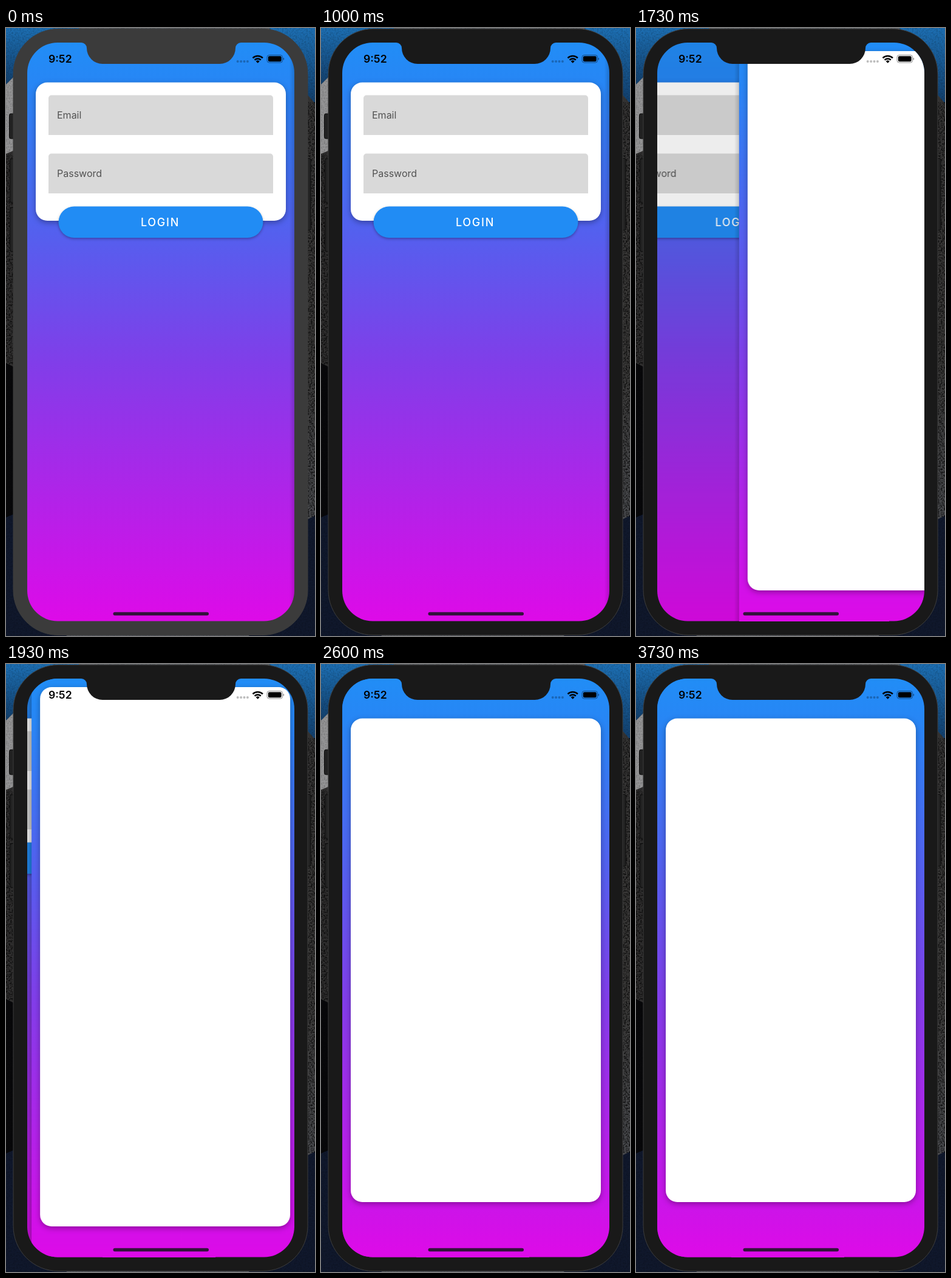
Write an HTML page that moves like this. It is 509 by 1000 pixels and loops after 3790 ms.

```html
<!DOCTYPE html>
<html lang="en">
<head>
<meta charset="utf-8">
<title>Login transition</title>
<style>
  html, body { margin: 0; width: 100%; height: 100%; overflow: hidden; background: #000; }
  svg { display: block; width: 509px; height: 1000px; font-family: Inter, sans-serif; }

  .anim { animation: 3790ms linear infinite; }
  .hard { animation-timing-function: step-end; }

  .bezel { fill: #191919; animation-name: bezel; }
  .press { opacity: 0; animation-name: press; }
  .label { fill: #fff; animation-name: label; }
  .login { animation-name: leave; }
  .next { animation-name: enter; }
  .dim { animation-name: dim; }
  .loose { animation-name: loose; }
  .inset { animation-name: inset; }

  .card { fill: #fff; filter: drop-shadow(0 3px 5px rgba(0, 0, 0, .33)); }
  .button { fill: #218cf4; filter: drop-shadow(0 2px 2px rgba(0, 0, 0, .3)); }
  .field { fill: #d9d9d9; }
  .hint { fill: #525252; font-size: 16px; }

  /* window loses its highlight at 70 ms */
  @keyframes bezel { 0% { fill: #3b3b3b; } 1.847%, 100% { fill: #191919; } }

  /* button held from 1400 to 1600 ms */
  @keyframes press { 0%, 42.2%, 100% { opacity: 0; } 36.94% { opacity: .13; } }
  @keyframes label { 0%, 42.2%, 100% { opacity: 1; } 36.94% { opacity: .78; } }

  /* push from 1615 to 2115 ms */
  @keyframes enter {
    0% { transform: translateX(440px); }
    42.612% { transform: translateX(440px); animation-timing-function: cubic-bezier(.2833, .99, .3183, .99); }
    55.805%, 100% { transform: none; }
  }
  @keyframes leave {
    0% { transform: none; }
    42.612% { transform: none; animation-timing-function: cubic-bezier(.2833, .99, .3183, .99); }
    55.805%, 100% { transform: translateX(-132px); }
  }
  @keyframes dim {
    0% { opacity: 0; }
    42.612% { opacity: 0; animation-timing-function: cubic-bezier(.2833, .99, .3183, .99); }
    55.805%, 100% { opacity: .1; }
  }

  /* safe area applies once the push is over */
  @keyframes loose { 0% { opacity: 1; } 56.2%, 100% { opacity: 0; } }
  @keyframes inset { 0% { opacity: 0; } 56.2%, 100% { opacity: 1; } }
</style>
</head>
<body>
<svg viewBox="0 0 509 1000" xmlns="http://www.w3.org/2000/svg">
  <defs>
    <linearGradient id="sky" x1="0" y1="0" x2="0" y2="1">
      <stop offset="0" stop-color="#218df6"/>
      <stop offset=".07" stop-color="#2786f5"/>
      <stop offset=".34" stop-color="#565eee"/>
      <stop offset=".55" stop-color="#803ee9"/>
      <stop offset="1" stop-color="#de0ae8"/>
    </linearGradient>
    <linearGradient id="blue" x1="0" y1="0" x2="0" y2="1">
      <stop offset="0" stop-color="#1d6fb3"/>
      <stop offset="1" stop-color="#123f6c"/>
    </linearGradient>
    <linearGradient id="stone" x1="0" y1="0" x2="0" y2="1">
      <stop offset="0" stop-color="#343333"/>
      <stop offset=".55" stop-color="#3a3938"/>
      <stop offset="1" stop-color="#55585f"/>
    </linearGradient>
    <linearGradient id="edge">
      <stop offset="0" stop-opacity="0"/>
      <stop offset="1" stop-opacity=".16"/>
    </linearGradient>
    <filter id="grain" x="0" y="0" width="1" height="1">
      <feTurbulence type="fractalNoise" baseFrequency=".4" numOctaves="3" seed="4"/>
      <feColorMatrix values="0 0 0 0 0  0 0 0 0 0  0 0 0 0 0  3 0 0 0 -1.2"/>
    </filter>
    <clipPath id="screen"><rect x="35" y="24" width="440" height="951.5" rx="50"/></clipPath>
  </defs>

  <!-- wallpaper -->
  <rect width="509" height="1000" fill="url(#stone)"/>
  <rect y="200" width="60" height="360" fill="#302f2f"/>
  <path d="M0 0H130V70L12 81 0 93Z" fill="url(#blue)"/>
  <path d="M120 0H434V10H120Z" fill="#5f6469"/>
  <path d="M434 0H509V124L490 102Z" fill="url(#blue)"/>
  <path d="M0 93 14 79V201L0 207Z" fill="#959596"/>
  <path d="M0 551 14 558V800L0 806Z" fill="#08080a"/>
  <path d="M0 805 14 799 100 1000H0Z" fill="#10182c"/>
  <path d="M509 802 495 809 400 1000H509Z" fill="#10182c"/>
  <rect y="207" width="14" height="346" filter="url(#grain)" opacity=".65"/>
  <rect x="495" y="122" width="14" height="682" filter="url(#grain)" opacity=".65"/>
  <rect width="509" height="1000" filter="url(#grain)" opacity=".15"/>

  <!-- phone -->
  <g fill="#222" stroke="#0b0b0b">
    <rect x="5.5" y="141" width="12" height="41" rx="2.5"/>
    <rect x="6.5" y="215" width="12" height="72" rx="2.5"/>
    <rect x="6.5" y="295.500" width="12" height="72" rx="2.5"/>
    <rect x="490" y="214.500" width="12" height="118" rx="2.5"/>
  </g>
  <rect class="bezel anim hard" x="12" y="1.500" width="485" height="997" rx="74" stroke="#3d3d3d"/>

  <g clip-path="url(#screen)">
    <g class="login anim">
      <rect x="35" y="24" width="440" height="952" fill="url(#sky)"/>
      <rect class="card" x="49" y="89.500" width="412" height="227.500" rx="19"/>
      <path class="field" d="M70 176V115.500a5 5 0 0 1 5-5H435a5 5 0 0 1 5 5V176Z"/>
      <path class="field" d="M70 272V211.500a5 5 0 0 1 5-5H435a5 5 0 0 1 5 5V272Z"/>
      <text class="hint" x="84" y="148.500">Email</text>
      <text class="hint" x="84" y="244.500">Password</text>
      <rect class="button" x="86.500" y="293.500" width="337" height="51.500" rx="25.750"/>
      <rect class="press anim hard" x="86.500" y="293.500" width="337" height="51.500" rx="25.750"/>
      <text class="label anim hard" x="222" y="326" font-size="18" font-weight="500" letter-spacing="1.7">LOGIN</text>
    </g>
    <rect class="dim anim" x="35" y="24" width="440" height="952"/>

    <g class="next anim">
      <rect x="27" y="24" width="8" height="952" fill="url(#edge)"/>
      <rect x="35" y="24" width="440" height="952" fill="url(#sky)"/>
      <g class="loose anim hard"><rect class="card" x="49" y="38" width="412" height="887" rx="19"/></g>
      <g class="inset anim hard"><rect class="card" x="49" y="89.500" width="412" height="795.500" rx="19"/></g>
    </g>
  </g>

  <path class="bezel anim hard" d="M124 23V24a9 9 0 0 1 9 9a26 26 0 0 0 26 26H352a26 26 0 0 0 26-26a9 9 0 0 1 9-9V23Z"/>

  <!-- status bar -->
  <text x="70" y="57" font-size="17.600" font-weight="600">9:52</text>
  <g opacity=".26">
    <circle cx="381.700" cy="55" r="2"/>
    <circle cx="387.100" cy="55" r="2"/>
    <circle cx="392.500" cy="55" r="2"/>
    <circle cx="397.900" cy="55" r="2"/>
  </g>
  <g fill="none" stroke="#000" stroke-width="2.500">
    <path d="M406.500 49.300a11.700 11.700 0 0 1 16.400 0"/>
    <path d="M409.600 52.600a7.300 7.300 0 0 1 10.200 0"/>
  </g>
  <path d="M411.700 54.700a4.300 4.300 0 0 1 6 0L414.700 57.700Z"/>
  <rect x="430" y="44.500" width="25.500" height="12.500" rx="3.600" fill="none" stroke="#000" stroke-opacity=".45"/>
  <rect x="431.800" y="46.200" width="21.900" height="9.100" rx="2.200"/>
  <path d="M456.700 48.700a2.300 2.300 0 0 1 0 4.200Z" opacity=".5"/>

  <rect x="176.500" y="960.700" width="157.500" height="5.600" rx="2.800" fill="#32133a"/>
</svg>
</body>
</html>
```
